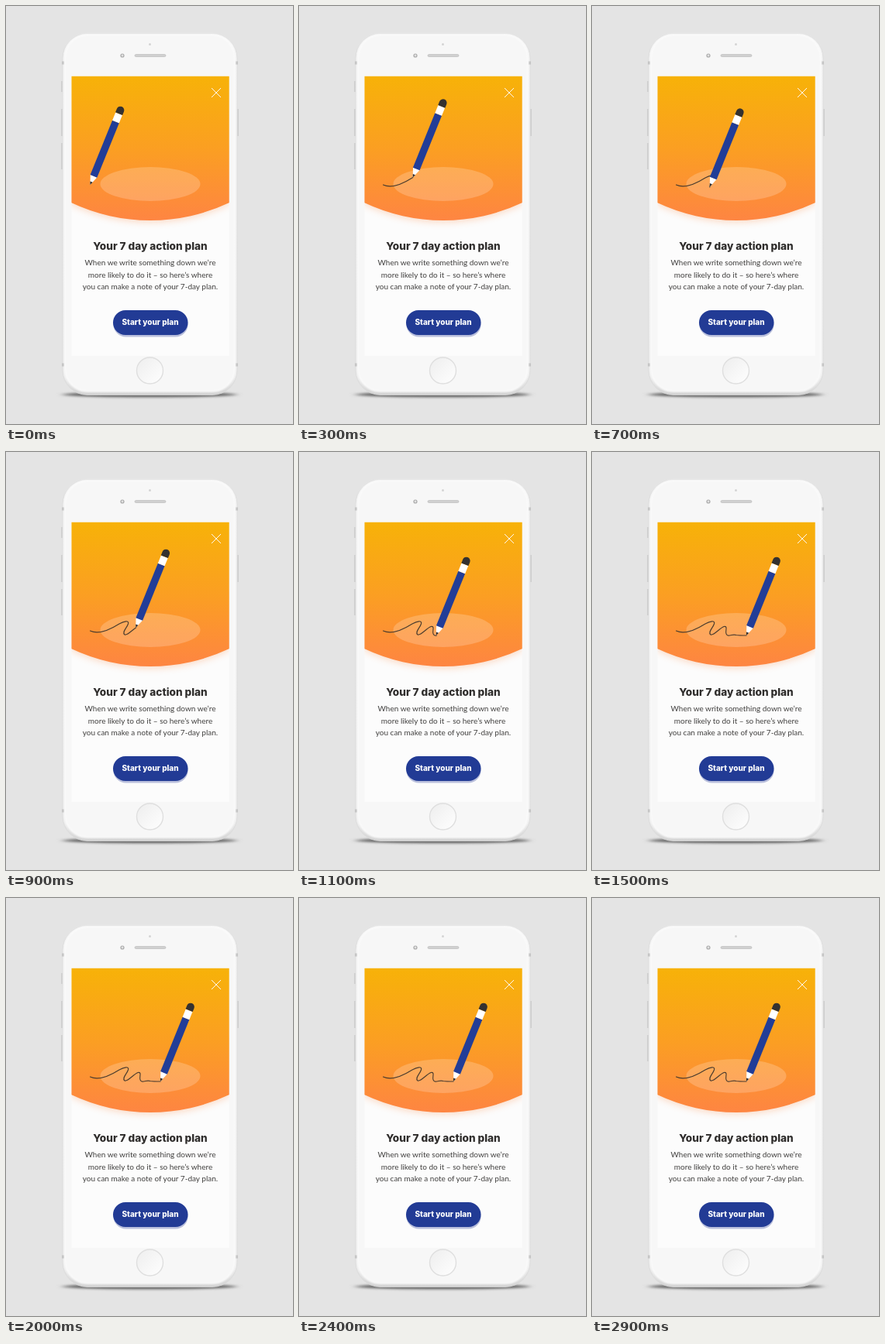
An HTML page for the animation above (3000 ms loop, 370 by 540 pixels).

```html
<!DOCTYPE html>
<html lang="en">
<head>
<meta charset="utf-8">
<title>Action plan</title>
<style>
  html, body { margin: 0; width: 100%; height: 100%; overflow: hidden; background: #e4e4e4; }
  svg { display: block; }
  text { text-anchor: middle; fill: #403f3e; }
  .copy { font: 10px Lato, sans-serif; }
  .title { font: 800 13.6px Inter, sans-serif; fill: #302e2d; }
  .label { font: 800 10px Inter, sans-serif; fill: #fff; }
</style>
</head>
<body>
<svg width="370" height="540" viewBox="0 0 370 540">
  <defs>
    <linearGradient id="sky" x2="0" y2="1">
      <stop stop-color="#f7b208"/>
      <stop offset=".5" stop-color="#fb9f22"/>
      <stop offset="1" stop-color="#fe8542"/>
    </linearGradient>
    <linearGradient id="shell" x2="0" y2="1">
      <stop stop-color="#f0f0f0"/>
      <stop offset=".95" stop-color="#ececec"/>
      <stop offset="1" stop-color="#d2d2d2"/>
    </linearGradient>
    <linearGradient id="button" x2="1" y2="1">
      <stop stop-color="#ededed"/>
      <stop offset="1" stop-color="#fff"/>
    </linearGradient>
    <filter id="blur" x="-20%" y="-200%" width="140%" height="500%"><feGaussianBlur stdDeviation="4 1.5"/></filter>
    <filter id="soft"><feGaussianBlur stdDeviation="1"/></filter>
    <filter id="glow"><feGaussianBlur stdDeviation="4"/></filter>
    <clipPath id="screen"><path d="M84.500 90.700H287.700V452H84.500Z"/></clipPath>
  </defs>

  <!-- phone -->
  <ellipse cx="185" cy="502" rx="112" ry="3.500" fill="#666" filter="url(#blur)"/>
  <path d="M72 97V111M72 133V168M72 177V211M299 133V168" stroke="#cfcfcf" stroke-width="2"/>
  <rect x="73" y="35.500" width="225" height="467" rx="32" fill="url(#shell)" stroke="#dadada" stroke-width=".8"/>
  <path d="M72 73.500H75M296 73.500H299M72 463.500H75M296 463.500H299" stroke="#c4c4c4" stroke-width="4"/>
  <rect x="76" y="37" width="219" height="461" rx="29" fill="#f7f7f7" stroke="#fff" stroke-width="1.500" filter="url(#soft)"/>
  <circle cx="185.500" cy="49.500" r="1.500" fill="#d4d4d4"/>
  <circle cx="150" cy="64" r="2" fill="#e2e2e2" stroke="#aaa" stroke-width="1.200"/>
  <rect x="166" y="62.500" width="40" height="3" rx="1.500" fill="#d0d0d0" stroke="#b9b9b9" stroke-width=".6"/>
  <circle cx="185.500" cy="471" r="17" fill="url(#button)" stroke="#dfdfdf" stroke-width="1.400"/>

  <!-- screen -->
  <g clip-path="url(#screen)">
    <path d="M84 90H288V452H84Z" fill="#fcfcfc"/>
    <path d="M84 180H288V257A238 238 0 0 1 84 257Z" fill="#fd9a5c" opacity=".3" filter="url(#glow)"/>
    <path d="M84 90H288V254A238 238 0 0 1 84 254Z" fill="url(#sky)"/>
  </g>
  <path d="M265 106L277 118M277 106L265 118" stroke="#fff" stroke-width=".95"/>
  <ellipse cx="186" cy="230" rx="64.500" ry="22" fill="#fff" opacity=".2"/>

  <text class="title" x="186" y="314.500">Your 7 day action plan</text>
  <text class="copy" x="186" y="335">When we write something down we’re</text>
  <text class="copy" x="186" y="350.500">more likely to do it – so here’s where</text>
  <text class="copy" x="186" y="366">you can make a note of your 7-day plan.</text>

  <rect x="138.500" y="395.500" width="96" height="32" rx="16" fill="#b9bfdc"/>
  <rect x="138" y="393" width="96.500" height="32" rx="16" fill="#223b95"/>
  <text class="label" x="186" y="412">Start your plan</text>

  <!-- scribble and pencil -->
  <path id="line" fill="none" stroke="#4a3c2e" stroke-width="1.150" stroke-linecap="round"
    d="M108.500 231C120 236.500 135 229 146 222C152 218.500 159 217 157.500 222C156 227 149 233 153 236C157 237.500 164 228 170 225.500C177 224 169 235 175 237C179 237.500 182 235 186 236.500C190 237 195 237 199 237"/>
  <g id="pencil">
    <path d="M0 0L-4.700 -12.500H4.700Z" fill="#fff"/>
    <path d="M0 0L-1.700 -4.300H1.700Z" fill="#302d2c"/>
    <path d="M-4.700 -12H4.700V-88H-4.700Z" fill="#223d97"/>
    <path d="M-4.700 -88H4.700V-99H-4.700Z" fill="#fff"/>
    <path d="M-4.900 -99V-104A4.900 4.900 0 0 1 4.900 -104V-99Z" fill="#343130"/>
  </g>
</svg>
<script>
  const LOOP = 3000, STEP = 100;
  const line = document.getElementById('line');
  const pencil = document.getElementById('pencil');
  const total = line.getTotalLength();
  // [time in ms, length drawn]
  const keys = [[0, 0], [300, 41], [700, 68], [1100, 108], [1500, total], [LOOP, total]];

  function drawnAt(t) {
    const i = keys.findIndex(([time]) => time > t);
    const [t0, a] = keys[i - 1], [t1, b] = keys[i];
    return a + (b - a) * (t - t0) / (t1 - t0);
  }

  function draw(now) {
    const t = Math.floor(now % LOOP / STEP) * STEP;
    const length = drawnAt(t);
    const { x, y } = line.getPointAtLength(length);
    line.style.visibility = length ? 'visible' : 'hidden';
    line.setAttribute('stroke-dasharray', `${length} ${total + 9}`);
    pencil.setAttribute('transform', `translate(${x} ${y}) rotate(22)`);
    requestAnimationFrame(draw);
  }
  draw(0);
</script>
</body>
</html>
```
